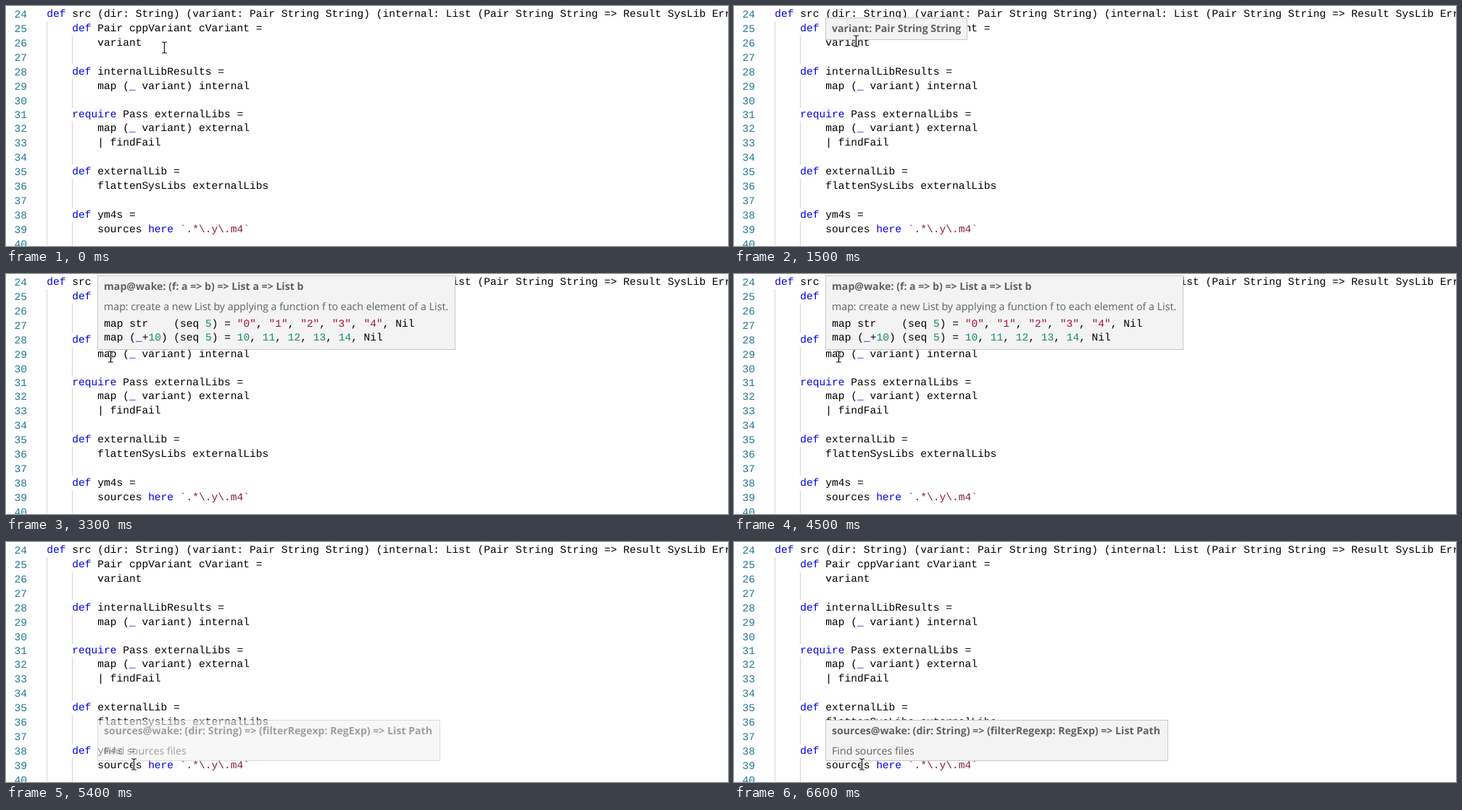
Animation, 996 px wide and 332 px high, one loop 7.2 s. Source, as an HTML page:

```html
<!DOCTYPE html>
<html lang="en">
<head>
<meta charset="utf-8">
<title>Hover hints in a code editor</title>
<style>
html, body { margin: 0; width: 100%; height: 100%; overflow: hidden; background: #fff; }
svg { display: block; width: 996px; height: 332px; }
text { white-space: pre; text-rendering: geometricPrecision; }
.code { font: 14.575px "Liberation Mono", monospace; fill: #000; }
.num { fill: #237893; }
.key { fill: #0000e6; }
.str { fill: #a31535; }
.regex { fill: #811f3f; }
.digit { fill: #198a72; }
.title { font: bold 14.13px "Open Sans", sans-serif; fill: #616161; }
.desc { font: 14.22px "Open Sans", sans-serif; fill: #616161; }
.guide { fill: #d6d3d8; }
.box { fill: #f3f3f3; stroke: #c8c8c8; }
</style>
</head>
<body>
<svg id="stage" viewBox="0 0 996 332"></svg>
<script>
const FIRST = 24;
const lines = `def src (dir: String) (variant: Pair String String) (internal: List (Pair String String => Result SysLib Error
    def Pair cppVariant cVariant =
        variant

    def internalLibResults =
        map (_ variant) internal

    require Pass externalLibs =
        map (_ variant) external
        | findFail

    def externalLib =
        flattenSysLibs externalLibs

    def ym4s =
        sources here \`.*\\.y\\.m4\`
`.split("\n");

const tips = {
  variant: { y: 16, w: 195, h: 30, title: "variant: Pair String String" },
  map: {
    y: 2, w: 493, h: 102, title: "map@wake: (f: a => b) => List a => List b",
    desc: "map: create a new List by applying a function f to each element of a List.",
    code: ['map str    (seq 5) = "0", "1", "2", "3", "4", Nil',
           "map (_+10) (seq 5) = 10, 11, 12, 13, 14, Nil"]
  },
  sources: {
    y: 246, w: 472, h: 56, desc: "Find sources files",
    title: "sources@wake: (dir: String) => (filterRegexp: RegExp) => List Path"
  }
};

// start time, pointer x, pointer y, open tip, tip opacity
const steps = [
  [0, 219, 58],
  [900, 205, 57],
  [1200, 169, 49],
  [1500, 169, 49, "variant", 1],
  [2400, 166, 69, "variant", 1],
  [2700, 150, 104],
  [3000, 145, 115],
  [3300, 145, 115, "map", 1],
  [4800, 163, 215],
  [5100, 177, 308],
  [5400, 177, 308, "sources", 0.6],
  [5700, 177, 308, "sources", 1]
];

const text = (x, y, cls, body) => `<text x="${x}" y="${y}" class="${cls}">${body}</text>`;
const rect = (x, y, w, h, cls) => `<rect x="${x}" y="${y}" width="${w}" height="${h}" class="${cls}"/>`;

const tokens = /(`.*`)|("\d")|(\b(?:def|require|here)\b|_)|(\b\d+\b)/g;
const paint = s => s.replace(tokens, (t, regex, str, key) =>
  `<tspan class="${regex ? "regex" : str ? "str" : key ? "key" : "digit"}">${t}</tspan>`);

// rows are 20px apart, tightening by 2px in total around the middle
const rowTop = i => 20 * i - Math.min(2, Math.max(0, i - 6));

function editor() {
  let out = rect(56, 21, 1, 311, "guide");
  lines.forEach((line, i) => {
    const y = rowTop(i);
    if (i > 1 && !/^    \S/.test(line)) out += rect(91, y + 1, 1, 20, "guide");
    out += text(11.4, y + 16, "code num", FIRST + i) + text(56.3, y + 15, "code", paint(line));
  });
  return out;
}

function tip(name) {
  const { y, w, h, title, desc, code = [] } = tips[name];
  let out = rect(126.5, y + 0.5, w, h, "box") + text(135, y + 20, "title", title);
  if (desc) out += text(135, y + 48, "desc", desc);
  code.forEach((line, i) => out += text(135.2, y + 71 + i * 19, "code", paint(line)));
  return `<g id="${name}">${out}</g>`;
}

const beam = "M-3.5-7.5h2.5l1 1 1-1h2.5M0-6.5v13M-3.5 7.5h2.5l1-1 1 1h2.5";
const stage = document.getElementById("stage");
stage.innerHTML = editor() + Object.keys(tips).map(tip).join("") +
  `<g id="pointer" fill="none"><path d="${beam}" stroke="#fff" stroke-width="2.6"/>` +
  `<path d="${beam}" stroke="#111" stroke-width="1.2"/></g>`;

const find = id => document.getElementById(id);
const start = performance.now();

function draw(now) {
  const t = Math.max(0, now - start) % 7200;
  const [, x, y, open, alpha] = steps.findLast(s => s[0] <= t);
  find("pointer").setAttribute("transform", `translate(${x - 0.5} ${y - 0.5})`);
  for (const name in tips) find(name).setAttribute("opacity", name === open ? alpha : 0);
  requestAnimationFrame(draw);
}
draw(start);
</script>
</body>
</html>
```
